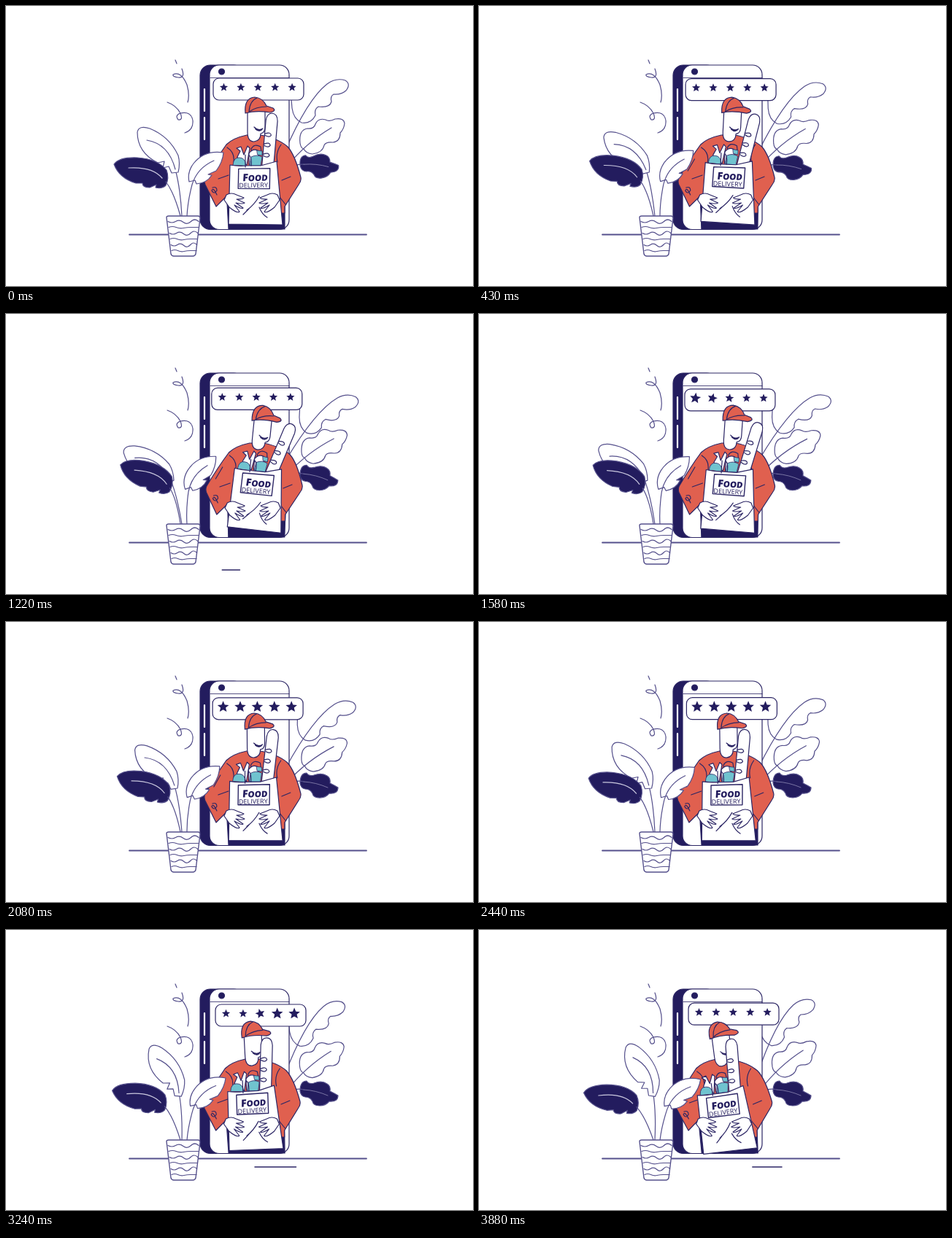
An HTML page for the animation above (3.96 s loop, 640 by 384 pixels).

```html
<!DOCTYPE html>
<html lang="en">
<head>
<meta charset="utf-8">
<title>Food delivery</title>
<style>
  html, body { margin: 0; width: 100%; height: 100%; overflow: hidden; background: #fff; }
  svg { display: block; width: 640px; height: 384px; }
  .art { fill: none; stroke: #2c2665; stroke-width: 1.2; stroke-linecap: round; stroke-linejoin: round; }
  .soft { stroke: #55508c; }
  .white { fill: #fff; }
  .red { fill: #e0604f; }
  .teal { fill: #70c3cf; }
  .navy { fill: #231c5e; }
  text { fill: #231c5e; stroke: none; font-family: "Open Sans", sans-serif; }
</style>
</head>
<body>
<svg viewBox="0 0 640 384">
  <defs>
    <path id="hand" class="white" d="M302 259Q309 255 316 259L326 263Q325 265 316 265L327 270Q325 272 315 270L325 277Q323 279 313 273L320 282Q317 285 306 276L299 266Z"/>
    <path id="star" class="navy" stroke="none"/>
  </defs>
  <g class="art">
    <!-- plants behind the phone -->
    <g class="soft">
      <path id="tallLeaf" d="M382 200Q413 128 440 107Q452 98 465 102Q473 107 466 116Q459 122 449 121Q444 124 446 131Q444 140 428 138Q422 142 424 150Q418 162 405 160Q394 155 392 140L391 128"/>
      <g id="midLeaf">
        <path class="white" d="M403 188Q401 170 413 168Q422 169 424 162Q428 153 438 156Q443 159 451 155Q463 153 464 161Q463 169 458 174Q458 186 448 187Q438 186 436 191Q434 201 420 203Q411 202 408 196Q404 195 403 188Z"/>
        <path d="M385 220Q412 187 446 167"/>
      </g>
      <g id="darkRight">
        <path class="navy" d="M403 221Q403 207 412 207Q415 212 422 210Q433 206 440 211Q445 214 444 221Q450 224 455 227Q455 236 443 235Q438 241 430 241Q421 241 420 235Q417 229 410 229Q404 228 403 221Z"/>
        <path d="M390 220Q400 217 408 219"/>
        <path stroke="#8e8ab4" stroke-width=".8" d="M408 219Q425 220 441 227"/>
      </g>
    </g>

    <!-- phone -->
    <rect class="navy" x="266" y="81" width="60" height="225.500" rx="14"/>
    <rect class="white" x="279" y="81" width="109" height="225.500" rx="13"/>
    <path d="M280 98.500H388" stroke-width=".8"/>
    <circle class="navy" cx="295.500" cy="90" r="4"/>
    <path stroke="#fff" stroke-width="2.200" d="M272 114V144M272 153V183"/>

    <g id="panel">
      <rect class="white" x="284" y="99" width="124" height="30" rx="8"/>
      <g id="stars"></g>
    </g>

    <!-- courier -->
    <g id="torso">
      <path class="navy" d="M303 270H382V306H305Z"/>
      <path class="red" d="M330 177Q311 181 302 190Q287 211 273 236Q271 240 273 245L288 275L303 260L306 284H382V275L401 245Q405 240 404 235Q396 204 386 193Q374 182 349 177Z"/>
      <path d="M303 194Q314 201 312 214M291 237L305 232M294 210L285 226M377 190Q369 201 372 214M390 234L378 239M383 272L371 257M375 271V284"/>
      <path d="M283 249Q289 247 289 253Q285 259 282 253Q284 248 289 259"/>
    </g>
    <g id="head">
      <path class="white" d="M331 144V173Q331 186 340 186Q349 185 349 175Q355 174 355 166V144Z"/>
      <path d="M340 166Q346 172 352 168Q348 174 342 169" class="navy"/>
      <path class="red" d="M328 147Q326 126 341 125Q352 126 357 137L366 140Q371 144 362 146Q343 143 328 147Z"/>
      <path d="M333 145Q334 130 344 126M333 145Q343 138 357 138"/>
    </g>
    <g id="bag">
      <g id="bread">
        <path class="white" d="M351 222V157Q352 147 359 147Q366 147 367 157V222Z"/>
        <path d="M351 176Q359 172 360 177Q358 181 352 178M351 190Q359 186 360 191Q358 195 352 192M351 204Q359 200 360 205Q358 209 352 206"/>
      </g>
      <path class="red" d="M336 196Q340 188 349 193L350 200L337 203Z"/>
      <path class="white" d="M317 207L321 199L316 195L322 193L326 204L331 192L334 195L330 218L320 215Z"/>
      <path class="white" d="M333 202Q338 195 345 198L348 217H333Z"/>
      <path class="teal" stroke-width=".8" d="M311 218Q312 207 320 208Q328 208 329 219ZM336 207Q343 203 351 207L349 219H334ZM344 198L351 199V205L345 204Z"/>
      <path class="white" d="M307 218Q318 220 330 219L349 219L371 213L379 300L305 299Z"/>
      <path d="M328 204V221M333 205Q337 206 336 219M330 280Q340 273 347 261M325 286L333 278M347 276Q351 286 358 290"/>
      <g transform="rotate(-1 340 237)">
        <path class="white" stroke-width="1.400" d="M319 223L362 223L361 251L318 250Z"/>
        <text transform="translate(324 240) skewX(-5)" font-size="14" font-weight="800">F<tspan font-size="11.500">OOD</tspan></text>
        <text x="319" y="249" font-size="9">DELIVERY</text>
      </g>
    </g>
    <g id="hands">
      <use href="#hand"/>
      <use href="#hand" transform="translate(674 0) scale(-1 1)"/>
    </g>

    <!-- ground, curls and potted plant -->
    <path class="soft" stroke-width="1.800" d="M169 313.500H494"/>
    <path id="dashes" stroke-width="1.500"/>
    <path class="soft" d="M232 74L234 79M241 86Q246 99 236 98Q228 97 229 94Q240 89 248 108Q252 122 249 132M221 132Q233 136 239 147Q243 157 236 156Q231 150 239 147Q254 144 256 157Q257 170 245 174"/>
    <g class="soft">
      <g id="highStem">
        <path d="M241 288Q239 250 232 224"/>
        <g id="highLeaf">
          <path class="white" d="M180 173Q182 163 197 168Q224 179 236 205Q239 216 236 228L227 229L223 220L215 222L217 213L208 215Q180 201 180 173Z"/>
          <path d="M232 224Q223 189 193 184"/>
        </g>
      </g>
      <g id="darkLeaf">
        <path class="navy" d="M148 217Q155 207 180 208Q208 210 220 225Q224 236 219 246Q214 251 205 249L206 245L197 249Q187 249 187 243L178 243Q155 236 148 217Z"/>
        <path stroke="#c9c7de" d="M168 222Q201 220 214 236"/>
        <path d="M239 288Q230 255 219 241"/>
      </g>
      <g id="lowLeaf">
        <path class="white" d="M298 201Q272 197 257 216Q248 228 251 241L259 239L261 244Q275 243 282 232L277 231L288 226Q297 214 298 201Z"/>
        <path d="M285 212Q262 222 255 245Q249 268 248 288"/>
      </g>
      <path class="white" stroke-width="1.400" d="M220 290Q220 288 223 288H263Q266 288 266 291L260 340Q259 343 256 343H230Q227 343 226 340Z"/>
      <path id="waves"/>
    </g>
  </g>
</svg>
<script>
const LOOP = 3960, STEP = 72;
const times = [0, 860, 1580, 2080, 2800, 3240, 3880];
const pose = {
  lean:  [0, 6, 3.5, -0.7, -0.3, -3, -8],
  bread: [5, 18, 12.5, 6.5, 6, 4.5, 3],
  high:  [0, -6, -5, -0.6, 2, 4.5, 6],
  low:   [0, 6, 6, 3, 0, -2, -4],
  tall:  [0, 7, 7.3, 5.2, 0, -2.5, -5],
  mid:   [0, 3, 4, 3.4, 1, -0.7, -2],
  dark:  [-8, 0, 1, 0, 0, 0, 0],
  x:     [0, -2, -2, -0.7, 2, 3, 3],
  y:     [0, 1.5, 4, 4.8, 4.2, 3, 1]
};
const el = id => document.getElementById(id);
const set = (id, value) => el(id).setAttribute('transform', value);
const turn = (id, angle, x, y) => set(id, `rotate(${angle} ${x} ${y})`);

function slope(v, i) {
  const a = Math.max(i - 1, 0), b = Math.min(i + 1, v.length - 1);
  return (v[b] - v[a]) / (times[b] - times[a]);
}

// Cubic Hermite curve through the poses
function at(v, t) {
  let i = 0;
  while (i < times.length - 2 && t > times[i + 1]) i++;
  const d = times[i + 1] - times[i], u = Math.min((t - times[i]) / d, 1), w = 1 - u;
  return w * w * (1 + 2 * u) * v[i] + u * u * (3 - 2 * u) * v[i + 1]
    + d * u * w * (w * slope(v, i) - u * slope(v, i + 1));
}

function ease(t, start, end) {
  const u = Math.min(Math.max((t - start) / (end - start), 0), 1);
  return u * u * (3 - 2 * u);
}

function dash(x, y, length, t, start, full, fade, end) {
  const from = x + length * ease(t, fade, end), to = x + length * ease(t, start, full);
  return to - from > 0.5 ? `M${from} ${y}H${to}` : '';
}

const starPoints = Array.from({ length: 10 }, (_, i) => {
  const r = i % 2 ? 0.45 : 1, a = i * Math.PI / 5;
  return `${r * Math.sin(a)} ${-r * Math.cos(a)}`;
});
el('star').setAttribute('d', `M${starPoints.join('L')}Z`);
el('stars').innerHTML = '<use href="#star"/>'.repeat(5);
const stars = [...el('stars').children];

el('waves').setAttribute('d', Array.from({ length: 6 }, (_, i) => {
  const w = (42 - 1.6 * i) / 4;
  return `M${222 + i} ${295.5 + 8 * i}q${w / 2} ${i % 2 ? -2 : 3} ${w} 0t${w} 1t${w} -1t${w} 0`;
}).join(''));

function draw(t) {
  const p = {};
  for (const key in pose) p[key] = at(pose[key], t);

  set('panel', `translate(${p.x} ${p.y})`);
  stars.forEach((star, i) => {
    const grow = ease(t, 1250 + 90 * i, 1600 + 90 * i);
    const shrink = ease(t, 2660 + 190 * i, 3010 + 190 * i);
    const spin = 15 * Math.sin(Math.PI * (grow + shrink));
    star.setAttribute('transform',
      `translate(${298.5 + 23.4 * i} 111.700) rotate(${spin}) scale(${5.9 + 2.3 * (grow - shrink)})`);
  });

  const skew = `translate(0 300) skewX(${-0.31 * p.lean}) translate(0 -300)`;
  set('torso', skew);
  set('hands', skew);
  turn('head', p.lean, 342, 237);
  set('bag', `translate(${0.75 * p.lean} ${-0.55 * p.lean}) rotate(${p.lean} 342 237)`);
  turn('bread', p.bread, 359, 216);

  turn('highStem', p.high, 241, 288);
  turn('highLeaf', 1.5 * p.high, 232, 224);
  turn('darkLeaf', p.low, 241, 288);
  turn('lowLeaf', -p.low, 243, 288);
  turn('tallLeaf', p.tall, 385, 215);
  turn('midLeaf', p.mid, 385, 220);
  turn('darkRight', p.dark, 395, 218);

  el('dashes').setAttribute('d',
    dash(281, 351, 40, t, 530, 1200, 900, 1500) +
    dash(341, 325, 74, t, 2460, 3600, 3260, 4440));
}

function frame() {
  const t = performance.now() % LOOP;
  draw(Math.floor(t / STEP) * STEP);
  requestAnimationFrame(frame);
}
frame();
</script>
</body>
</html>
```
